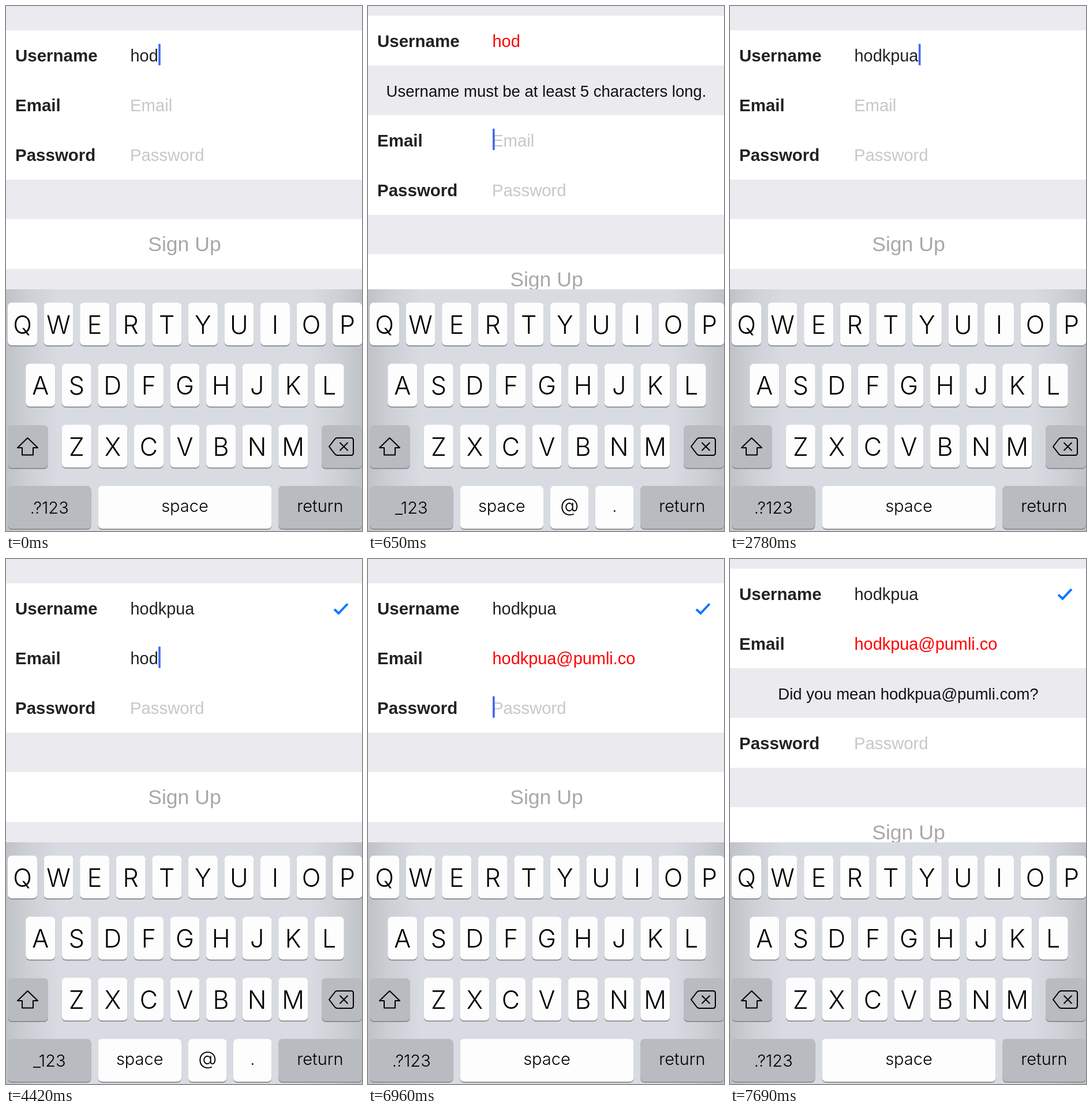
These frames come from a looping animation (617 px wide and 908 px high, 7.99 s). An HTML page:

```html
<!DOCTYPE html>
<html lang="en">
<head>
<meta charset="utf-8">
<title>Sign up form</title>
<style>
  html, body { margin: 0; width: 100%; height: 100%; overflow: hidden; background: #ebeaef; }
  svg { display: block; width: 617px; height: 908px; }
  text { font-family: "Liberation Sans", Arial, sans-serif; white-space: pre; }
  .label { font-size: 29.5px; font-weight: 700; fill: #222; }
  .value { font-size: 28.9px; fill: #222; }
  .value.bad { fill: #f00; }
  .hint { font-size: 29.3px; fill: #c7c7cc; }
  .message { font-size: 27.5px; fill: #111; text-anchor: middle; }
  .submit { font-size: 35.6px; fill: #a8a8aa; text-anchor: middle; }
  .key { font-family: Inter, Roboto, sans-serif; font-weight: 300; text-anchor: middle; fill: #000; }
  .icon { fill: none; stroke: #000; stroke-width: 2; stroke-linejoin: round; }
</style>
</head>
<body>
<svg id="stage" viewBox="0 0 617 908">
  <defs>
    <linearGradient id="board">
      <stop offset="0" stop-color="#bfc2c6"/>
      <stop offset=".06" stop-color="#cccfd4"/>
      <stop offset=".15" stop-color="#d8dbe2"/>
      <stop offset=".85" stop-color="#d8dbe2"/>
      <stop offset=".94" stop-color="#cccfd4"/>
      <stop offset="1" stop-color="#bfc2c6"/>
    </linearGradient>
  </defs>
  <rect width="617" height="908" fill="#ebeaef"/>
</svg>
<script>
const stage = document.getElementById('stage');
const ROW = 86, TOP = 42, FIELD_X = 216, LOOP = 7990;

function add(parent, tag, attrs = {}, text = '') {
  const node = document.createElementNS('http://www.w3.org/2000/svg', tag);
  for (const name in attrs) node.setAttribute(name, attrs[name]);
  node.textContent = text;
  parent.append(node);
  return node;
}
const moveTo = (node, y) => node.setAttribute('transform', `translate(0 ${y})`);
const show = (node, on) => node.setAttribute('visibility', on ? 'visible' : 'hidden');

// Form: messages come first so that they slide out from behind the rows.
const messages = [
  'Username must be at least 5 characters long.',
  'Did you mean hodkpua@pumli.com?'
].map(text => add(stage, 'text', { class: 'message', x: 309 }, text));

function makeRow() {
  const group = add(stage, 'g');
  add(group, 'rect', { width: 617, height: ROW + 0.3, fill: '#fff' });
  return group;
}

const rows = ['Username', 'Email', 'Password'].map(name => {
  const group = makeRow();
  add(group, 'text', { class: 'label', x: 16, y: 54 }, name);
  const hint = add(group, 'text', { class: 'hint', x: 215, y: 54 }, name);
  const value = add(group, 'text', { class: 'value', x: 215.5, y: 54 });
  const caret = add(group, 'rect', { y: 23.5, width: 3.6, height: 37, fill: '#4368ee' });
  return { group, hint, value, caret };
});
const check = add(rows[0].group, 'path', {
  d: 'M569 45 L576.5 52 L592 35.5', fill: 'none', stroke: '#087aff', 'stroke-width': 4
});
const submit = makeRow();
add(submit, 'text', { class: 'submit', x: 309.5, y: 55.5 }, 'Sign Up');

// Keyboard
const keyboard = add(stage, 'g');
add(keyboard, 'rect', { y: 490, width: 617, height: 418, fill: 'url(#board)' });

function key(parent, x, y, width, text, { size = 29, baseline = 45, gray = false } = {}) {
  const box = { x, width, height: 74, rx: 7 };
  add(parent, 'rect', { ...box, y: y + 1.8, fill: '#85888c' });
  add(parent, 'rect', { ...box, y, fill: gray ? '#b8bbc0' : '#fdfdfd' });
  add(parent, 'text', { class: 'key', x: x + width / 2, y: y + baseline, 'font-size': size }, text);
}

[['QWERTYUIOP', 3, 513], ['ASDFGHJKL', 34.2, 618.7], ['ZXCVBNM', 96.8, 724.3]].forEach(([letters, x, y]) =>
  [...letters].forEach((letter, i) =>
    key(keyboard, x + i * 62.57, y, 51, letter, { size: 43, baseline: 53.5 })));

key(keyboard, 3, 725, 70, '', { gray: true });
key(keyboard, 547, 725, 70, '', { gray: true });
key(keyboard, 472, 830, 145, 'return', { gray: true });
add(keyboard, 'path', { class: 'icon', d: 'M37.5 747 L55 764 H47 V776.5 H28 V764 H20 Z' });
add(keyboard, 'path', {
  class: 'icon',
  d: 'M574 747 H598 Q602 747 602 751 V773 Q602 777 598 777 H574 Q572 777 570 775 L560 762 L570 749 Q572 747 574 747 Z M578.5 755 L592.5 769 M592.5 755 L578.5 769'
});

const plainKeys = add(keyboard, 'g');
key(plainKeys, 3, 830, 144.5, '.?123', { gray: true, baseline: 48 });
key(plainKeys, 159.5, 830, 301, 'space');

const emailKeys = add(keyboard, 'g');
key(emailKeys, 3, 830, 144.5, '_123', { gray: true, baseline: 48 });
key(emailKeys, 159.5, 830, 144.5, 'space');
key(emailKeys, 316, 830, 66.5, '@', { size: 33 });
key(emailKeys, 394, 830, 66.5, '.');

// Each step changes part of the state and holds until the next one.
const start = {
  user: 'hod', email: '', focus: 0, caret: 1, scroll: 0,
  gaps: [0, 0], badUser: false, badEmail: false, valid: false
};
const changes = [
  [140, { focus: 1, badUser: true }],
  [290, { scroll: 14 }],
  [440, { scroll: 25.3, gaps: [30, 0] }],
  [650, { gaps: [ROW, 0] }],
  [1100, { caret: 0.5 }],
  [1250, { caret: 0 }],
  [1540, { focus: 0, caret: 1 }],
  [1690, { gaps: [78, 0] }],
  [1840, { gaps: [46, 0] }],
  [1990, { gaps: [13, 0], scroll: 24.3 }],
  [2200, { gaps: [0, 0], scroll: 10 }],
  [2340, { scroll: 0 }],
  [2490, { user: 'hodk', badUser: false }],
  [2640, { user: 'hodkpu' }],
  [2780, { user: 'hodkpua' }],
  [3380, { focus: 1, valid: true }],
  [3980, { caret: 0.5 }],
  [4130, { email: 'h', caret: 1 }],
  [4270, { email: 'ho' }],
  [4420, { email: 'hod' }],
  [4570, { email: 'hodk' }],
  [4720, { email: 'hodkp' }],
  [4870, { email: 'hodkpua' }],
  [5170, { email: 'hodkpua@' }],
  [5320, { email: 'hodkpua@p' }],
  [5460, { email: 'hodkpua@pu' }],
  [5610, { email: 'hodkpua@pum' }],
  [5760, { email: 'hodkpua@pumli' }],
  [6060, { email: 'hodkpua@pumli.' }],
  [6210, { email: 'hodkpua@pumli.co' }],
  [6660, { caret: 0.5 }],
  [6810, { caret: 0 }],
  [6950, { focus: 2, caret: 1, badEmail: true }],
  [7100, { scroll: 14 }],
  [7250, { scroll: 25.3, gaps: [0, 30] }],
  [7400, { gaps: [0, 78] }],
  [7550, { gaps: [0, ROW], caret: 0.5 }],
  [7690, { caret: 0 }]
];
const steps = [{ time: 0, ...start }];
for (const [time, change] of changes) steps.push({ ...steps.at(-1), time, ...change });

function render(state) {
  const values = [state.user, state.email, ''];
  const bad = [state.badUser, state.badEmail, false];
  let y = TOP - state.scroll;

  rows.forEach((row, i) => {
    moveTo(row.group, y);
    row.value.textContent = values[i];
    row.value.classList.toggle('bad', bad[i]);
    show(row.hint, !values[i]);
    const width = values[i] ? row.value.getComputedTextLength() : 0;
    row.caret.setAttribute('x', FIELD_X + width);
    row.caret.setAttribute('opacity', state.focus === i ? state.caret : 0);

    const gap = state.gaps[i] || 0;
    y += ROW + gap;
    if (messages[i]) {
      messages[i].setAttribute('y', y - ROW + 54);
      show(messages[i], gap > 0);
    }
  });
  moveTo(submit, y + 68.5);
  show(check, state.valid);
  show(emailKeys, state.focus === 1);
  show(plainKeys, state.focus !== 1);
}

let current;
const origin = performance.now();
function tick() {
  const time = (performance.now() - origin) % LOOP;
  const state = steps.findLast(step => step.time <= time) || steps[0];
  if (state !== current) render(current = state);
  requestAnimationFrame(tick);
}
tick();
</script>
</body>
</html>
```
